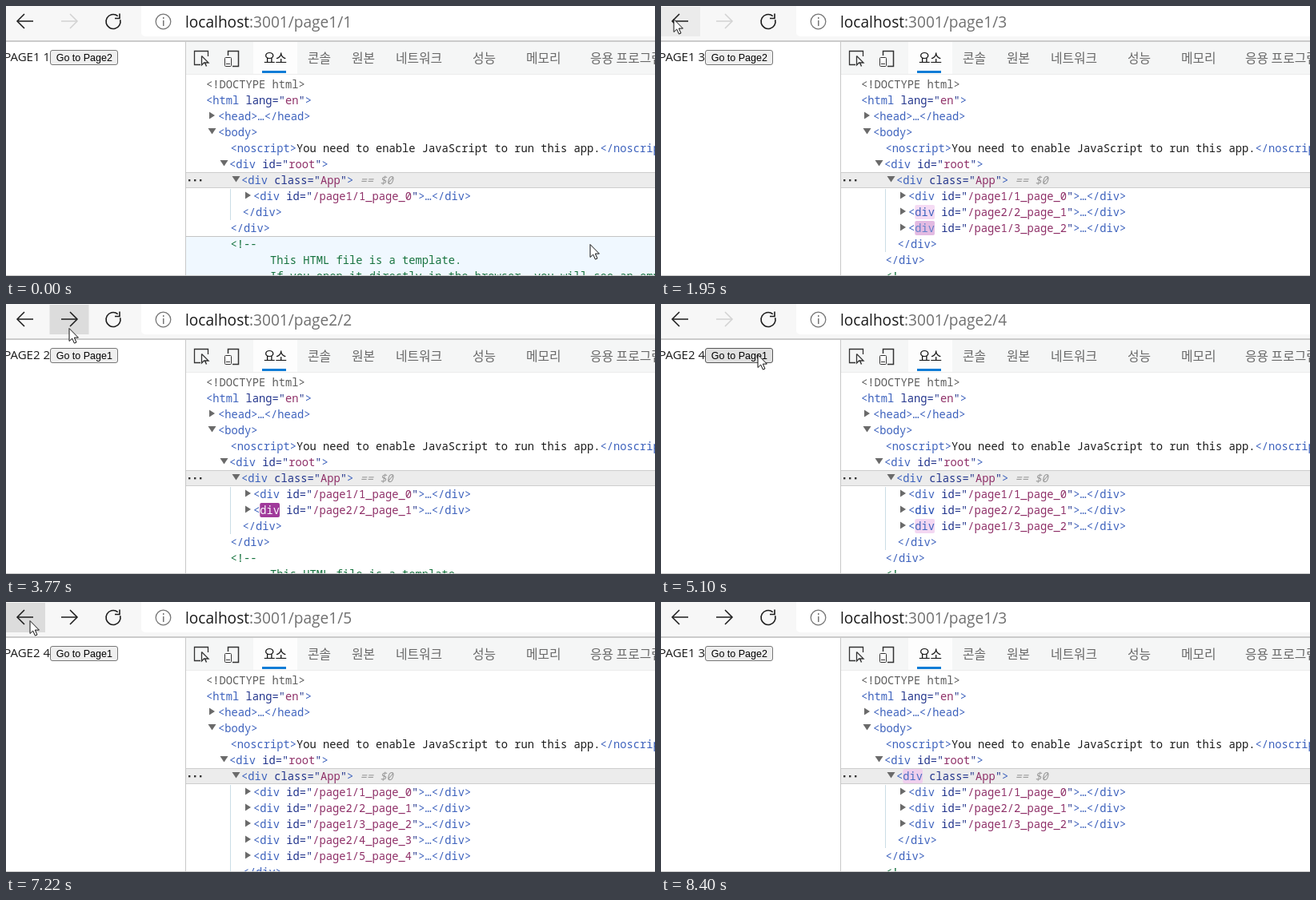
Recreate the animation shown at these times as an HTML page with a canvas. Size 811x338 px, loop 8480 ms.

```html
<!DOCTYPE html>
<html lang="ko">
<head>
<meta charset="utf-8">
<style>
html, body { margin: 0; width: 100%; height: 100%; overflow: hidden; background: #fff; }
canvas { display: block; width: 811px; height: 338px; }
</style>
</head>
<body>
<canvas id="stage" width="811" height="338"></canvas>
<script>
const ctx = document.getElementById('stage').getContext('2d');
const LOOP = 8480;
const URL_LAG = 45, TREE_LAG = 70;
const UI = '"Open Sans", "Noto Sans", sans-serif';
const HANGUL = '"Noto Sans CJK KR", "Noto Sans CJK", sans-serif';
const MONO = '13.75px "Noto Sans Mono", "DejaVu Sans Mono", monospace';
const CELL = 8.25;
const TAG = '#3d62bd', ATTR = '#23358c', VALUE = '#8f3068', GREEN = '#17733f', INK = '#1b1b1b';

// [time, page number reached]
const visits = [[0, 1], [780, 2], [1380, 3], [2180, 2], [2920, 1],
  [3695, 2], [4150, 3], [5040, 4], [5680, 5], [7200, 4], [7600, 3]];

// [time, x, y] of the pointer tip
const path = [[0, 730, 298], [90, 730, 298], [680, 116, 66], [1470, 116, 65],
  [1710, 36, 34], [1920, 16, 16], [3060, 20, 18], [3430, 50, 24], [3620, 79, 30],
  [4240, 79, 30], [4720, 121, 63], [6300, 121, 63], [6900, 62, 50], [7130, 30, 23],
  [7630, 30, 23], [7770, 240, 110], [8120, 560, 250], [8320, 818, 342]];

const tabs = [['요소', 322], ['콘솔', 377], ['원본', 432], ['네트워크', 487],
  ['성능', 583], ['메모리', 650], ['응용 프로그램', 730]];

const mix = (a, b, p) => a + (b - a) * p;
const inside = (p, x, y, w, h) => p.x >= x && p.x < x + w && p.y >= y && p.y < y + h;
const pageName = k => 'page' + (k % 2 ? 1 : 2) + '/' + k;

function visitIndex(t) {
  let i = 0;
  while (i + 1 < visits.length && visits[i + 1][0] <= t) i++;
  return i;
}

function pointerAt(t) {
  let i = 0;
  while (i + 2 < path.length && path[i + 1][0] <= t) i++;
  const [t0, x0, y0] = path[i], [t1, x1, y1] = path[i + 1];
  const p = Math.min(1, (t - t0) / (t1 - t0));
  const e = p * p * (3 - 2 * p);
  return { x: mix(x0, x1, e), y: mix(y0, y1, e) };
}

// cubic-bezier(0, 0, 0.2, 1)
function easeOut(x) {
  let lo = 0, hi = 1;
  for (let i = 0; i < 20; i++) {
    const s = (lo + hi) / 2;
    if (0.6 * (1 - s) * s * s + s * s * s < x) lo = s; else hi = s;
  }
  return 3 * (1 - lo) * lo * lo + lo * lo * lo;
}

function rect(x, y, w, h, color) {
  ctx.fillStyle = color;
  ctx.fillRect(x, y, w, h);
}

function roundRect(x, y, w, h, r, fill, stroke) {
  ctx.beginPath();
  ctx.roundRect(x, y, w, h, r);
  if (fill) { ctx.fillStyle = fill; ctx.fill(); }
  if (stroke) { ctx.strokeStyle = stroke; ctx.lineWidth = 1; ctx.stroke(); }
}

function text(str, x, y, font, color, align = 'left') {
  ctx.font = font;
  ctx.fillStyle = color;
  ctx.textAlign = align;
  ctx.fillText(str, x, y);
  return ctx.measureText(str).width;
}

function line(points, color, width) {
  ctx.beginPath();
  points.forEach(([x, y], i) => i ? ctx.lineTo(x, y) : ctx.moveTo(x, y));
  ctx.strokeStyle = color;
  ctx.lineWidth = width;
  ctx.stroke();
}

function polygon(points, fill) {
  ctx.beginPath();
  points.forEach(([x, y]) => ctx.lineTo(x, y));
  ctx.closePath();
  ctx.fillStyle = fill;
  ctx.fill();
}

function circle(x, y, r, color, width, from = 0, to = Math.PI * 2) {
  ctx.beginPath();
  ctx.arc(x, y, r, from, to);
  ctx.strokeStyle = color;
  ctx.lineWidth = width;
  ctx.stroke();
}

function navArrow(x, dir, color) {
  line([[x - 10 * dir, 19], [x + 9.5 * dir, 19]], color, 1.5);
  line([[x + dir, 10], [x + 10 * dir, 19], [x + dir, 28]], color, 1.5);
}

function navHover(x, t, step) {
  const pressed = visits.some(([at, k], i) =>
    i && Math.sign(k - visits[i - 1][1]) === step && t > at - 110 && t < at + 110);
  rect(x, 1, 49, 37, pressed ? '#dcdcdc' : '#ebebeb');
}

function toolbar(t, mouse) {
  const i = visitIndex(t), k = visits[i][1];
  const top = Math.max(...visits.slice(0, i + 1).map(v => v[1]));
  const ahead = k < top;
  rect(0, 0, 811, 44, '#f7f7f7');
  roundRect(169, -8, 660, 46, 5, '#fff');
  rect(0, 43, 811, 2, '#cbcbcb');
  if (inside(mouse, 0, 1, 49, 37)) navHover(0, t, -1);
  if (ahead && inside(mouse, 54, 1, 50, 37)) navHover(54.5, t, 1);
  navArrow(24, -1, INK);
  navArrow(79, 1, ahead ? INK : '#d2d2d2');
  circle(134, 19.5, 9, INK, 1.6, -0.25, Math.PI * 1.72);
  line([[142, 9.5], [142, 15.5], [136, 15.5]], INK, 1.6);
  circle(196.5, 19.5, 9.3, '#767676', 1.3);
  rect(196, 18, 1.5, 7, '#767676');
  rect(196, 14, 1.5, 2, '#767676');

  const url = pageName(visits[visitIndex(t - URL_LAG)][1]);
  const font = '19.1px ' + UI;
  const w = text('localhost', 224, 27, font, '#1a1a1a');
  text(':3001/' + url, 224 + w, 27, font, '#707070');
}

function page(t, mouse) {
  const k = visits[visitIndex(t)][1], own = k % 2 ? 1 : 2;
  text('PAGE' + own + ' ' + k, 55, 69, '15px ' + UI, INK, 'right');
  const over = inside(mouse, 55, 55, 85, 19);
  roundRect(55.5, 55.5, 84, 18, 2.5, over ? '#e1e1e1' : '#efefef', over ? '#555' : '#767676');
  text('Go to Page' + (3 - own), 62.7, 69, '12.5px "Liberation Sans", Arial, sans-serif', '#000');
}

function tabBar() {
  rect(225, 45, 586, 40, '#f5f6f6');
  rect(309, 45, 55, 40, '#fdfdfd');
  rect(225, 85, 586, 1, '#ececec');
  line([[243, 73.5], [235.5, 73.5], [235.5, 56.5], [252.5, 56.5], [252.5, 63]], '#333', 1.3);
  line([[244.5, 62.5], [244.5, 74], [247.5, 71], [253, 71], [244.5, 62.5]], '#333', 1.3);
  line([[248.5, 71], [250.5, 75.5]], '#333', 1.5);
  line([[277.5, 62], [277.5, 56.5], [290.5, 56.5], [290.5, 75.5], [283, 75.5]], '#333', 1.5);
  roundRect(273.5, 64.5, 8, 11, 1, '#fff', '#333');
  rect(275, 72, 5, 1, '#333');
  tabs.forEach(([label, x], i) => text(label, x, 71, '15.8px ' + HANGUL, i ? '#686868' : '#161616'));
  rect(320, 81, 30, 3, '#0f7cd6');
}

function code(parts, x, y) {
  for (const [str, color, style] of parts) {
    text(str, x, y, (style || '') + MONO, color);
    x += str.length * CELL;
  }
}

function flash(age, x, y) {
  if (age < 0 || age > 1400) return;
  const p = easeOut(Math.min(1, age / 1120));
  const fade = age > 1120 ? 1 - easeOut((age - 1120) / 280) : 1;
  const rgb = [mix(158, 245, p), mix(54, 219, p), mix(153, 244, p)];
  roundRect(x + CELL, y - 14, 3 * CELL, 18, 2, `rgba(${rgb},${fade})`);
  const ink = [mix(255, 61, p), mix(255, 98, p), mix(255, 189, p)];
  text('div', x + CELL, y, MONO, `rgb(${ink})`);
}

function caret(x, y, open) {
  polygon(open ? [[x - 5, y - 4], [x + 5, y - 4], [x, y + 3.5]]
    : [[x - 3, y - 4.5], [x + 4, y], [x - 3, y + 4.5]], '#6a6a6a');
}

const openTag = (tag, name, value, tail = '') => [['<' + tag, TAG],
  [` ${name}="`, ATTR], [value, VALUE], ['"', ATTR], ['>' + tail, TAG]];

function treeRows(t) {
  const i = visitIndex(t - TREE_LAG), count = visits[i][1];
  const shrunk = i > 0 && count < visits[i - 1][1];
  const rows = [
    { x: 250, parts: [['<!DOCTYPE html>', '#5d5d5d']] },
    { x: 250, parts: openTag('html', 'lang', 'en') },
    { x: 265, mark: 257, parts: [['<head>…</head>', TAG]] },
    { x: 265, mark: 257.5, open: true, parts: [['<body>', TAG]] },
    { x: 280.5, parts: [['<noscript>', TAG],
      ['You need to enable JavaScript to run this app.', INK], ['</noscript>', TAG]] },
    { x: 279, mark: 272.5, open: true, parts: openTag('div', 'id', 'root') },
    { x: 294, mark: 287.5, open: true, selected: true,
      age: shrunk ? t - TREE_LAG - visits[i][0] : -1,
      parts: [...openTag('div', 'class', 'App'), [' == $0', '#999', 'italic ']] }
  ];
  for (let k = 1; k <= count; k++) {
    let born = -1e6;
    for (let j = 1; j <= i; j++) {
      if (visits[j][1] === k && visits[j - 1][1] < k) born = visits[j][0];
    }
    rows.push({ x: 309, mark: 302, age: t - TREE_LAG - born,
      parts: openTag('div', 'id', `/${pageName(k)}_page_${k - 1}`, '…</div>') });
  }
  rows.push({ x: 295.5, parts: [['</div>', TAG]] }, { x: 280.5, parts: [['</div>', TAG]] });
  const note = ['<!--', '      This HTML file is a template.',
    '      If you open it directly in the browser, you will see an empty page.'];
  note.forEach(s => rows.push({ x: 280.5, note: true, parts: [[s, GREEN]] }));
  return { rows, count };
}

function tree(t, mouse) {
  const { rows, count } = treeRows(t);
  const hit = inside(mouse, 225, 88, 586, 250) ? Math.floor((mouse.y - 88) / 20) : -1;
  const noteHit = hit >= 0 && rows[hit] && rows[hit].note;
  rows.forEach((row, i) => {
    const top = 88 + i * 20;
    if (row.selected) {
      rect(225, top, 586, 20, '#ececec');
      rect(225, top, 586, 1, '#cdcdcd');
      rect(225, top + 19, 586, 1, '#cdcdcd');
      [230, 237, 244].forEach(x => rect(x - 2, 217, 2.4, 2.4, '#333'));
    } else if (i === hit || (noteHit && row.note)) {
      rect(225, top, 586, 20, '#f0f8ff');
      if (row.note && !rows[i - 1].note) rect(225, top, 586, 1, '#c4c4c4');
    }
  });
  rect(280, 229, 1, 20 * (count + 1) - 1, '#cbdde6');
  rows.forEach((row, i) => {
    const base = 103 + i * 20;
    if (row.mark) caret(row.mark, base - 6, row.open);
    code(row.parts, row.x, base);
    if (row.age !== undefined) flash(row.age, row.x, base);
  });
}

function pointer({ x, y }) {
  const shape = [[0, 0], [0, 16], [3.7, 12.6], [6.4, 18.6], [9, 17.5], [6.3, 11.6], [11.4, 11.6]]
    .map(([dx, dy]) => [x + dx, y + dy + 0.5]);
  polygon(shape, '#fff');
  line([...shape, shape[0]], '#111', 1);
}

function draw(t) {
  const mouse = pointerAt(t);
  rect(0, 0, 811, 338, '#fff');
  tree(t, mouse);
  tabBar();
  toolbar(t, mouse);
  page(t, mouse);
  rect(224, 45, 1, 293, '#c8c8c8');
  rect(0, 337, 811, 1, '#c8c8c8');
  pointer(mouse);
}

const start = performance.now();
function tick() {
  draw((performance.now() - start) % LOOP);
  requestAnimationFrame(tick);
}
tick();
</script>
</body>
</html>
```
